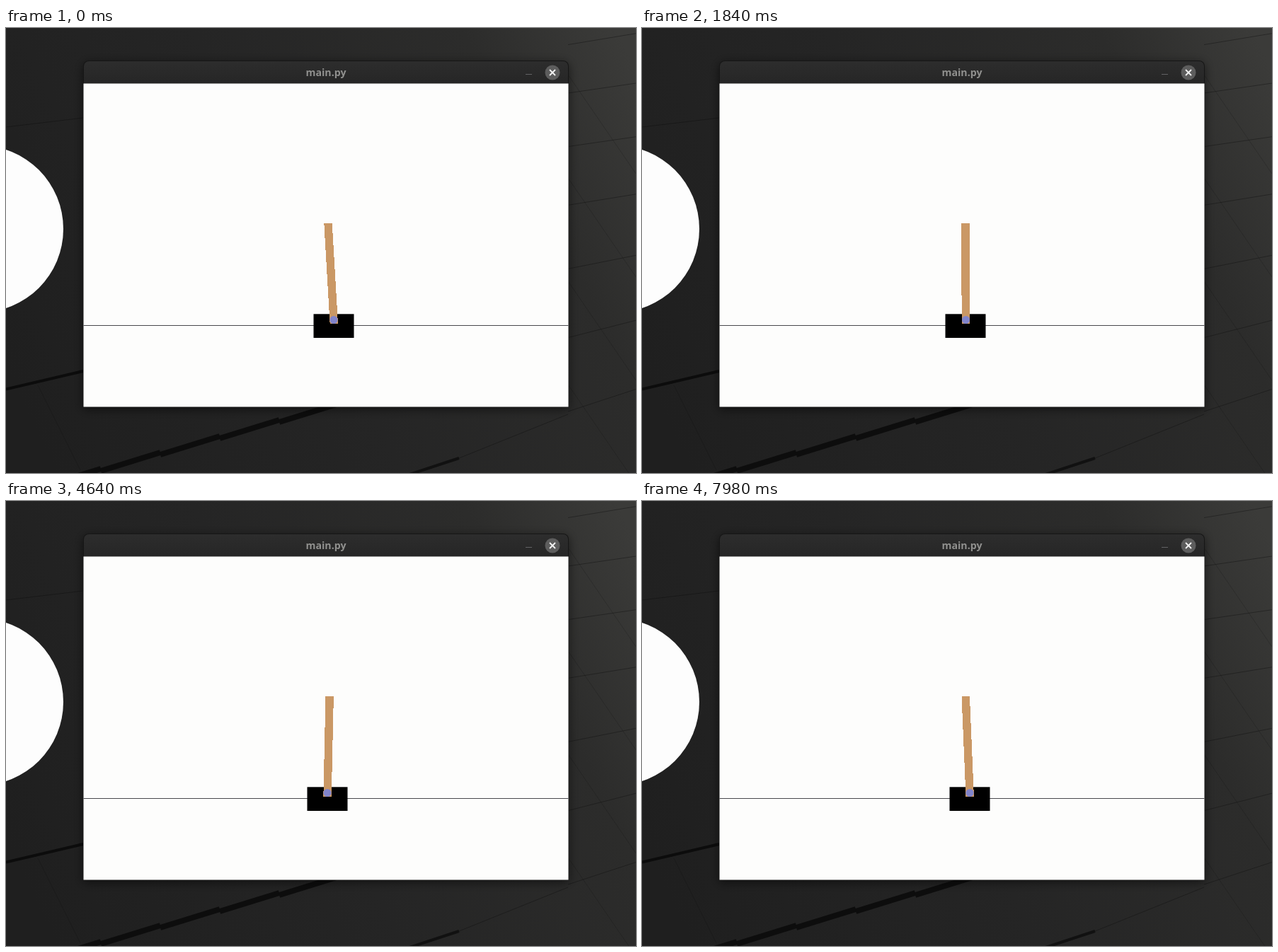
An HTML page with a canvas that plays this animation: 890 by 629 pixels, repeating every 8 s.

```html
<!DOCTYPE html>
<html lang="en">
<head>
<meta charset="utf-8">
<title>main.py</title>
<style>
  html, body { margin: 0; width: 100%; height: 100%; overflow: hidden; background: #252525; }
  canvas { display: block; }
</style>
</head>
<body>
<canvas id="stage" width="890" height="629"></canvas>
<script>
const W = 890, H = 629, LOOP = 8000;
const AXLE_Y = 412.5, REACH = 137, POLE_HALF = 5.7, CART_W = 57;

const ctx = document.getElementById('stage').getContext('2d');
const backdrop = document.createElement('canvas');
backdrop.width = W;
backdrop.height = H;

function line(g, x1, y1, x2, y2, color, width = 1) {
  g.beginPath();
  g.moveTo(x1, y1);
  g.lineTo(x2, y2);
  g.strokeStyle = color;
  g.lineWidth = width;
  g.stroke();
}

function disc(g, x, y, r, color) {
  g.beginPath();
  g.arc(x, y, r, 0, Math.PI * 2);
  g.fillStyle = color;
  g.fill();
}

function panel(g, x, y, w, h, r, fill) {
  g.beginPath();
  g.roundRect(x, y, w, h, [r, r, 0, 0]);
  g.fillStyle = fill;
  g.fill();
}

function drawWallpaper(g) {
  const shade = g.createLinearGradient(0, 480, W, 60);
  shade.addColorStop(0, '#1f1f1f');
  shade.addColorStop(0.45, '#252525');
  shade.addColorStop(0.8, '#2c2c2b');
  shade.addColorStop(1, '#3b3b39');
  g.fillStyle = shade;
  g.fillRect(0, 0, W, H);

  // Tile joints spread out towards the viewer
  const joint = 'rgba(12,12,12,0.38)', faint = 'rgba(12,12,12,0.2)';
  for (let i = -1; i <= 5; i++) {
    line(g, 794, 92 + 72 * i + 3.6 * i * i, W, 78 + 73 * i + 2.7 * i * i, joint);
  }
  for (let i = 0; i < 4; i++) {
    line(g, 794, 66 + 146 * i, W, 206 + 146 * i, faint);
  }
  line(g, 640, 608, 794, 546, joint);
  line(g, 0, 140, 109, 127, joint);
  line(g, 45, 505, 105, 625, faint);

  // Dark seams, the lower one in overlapping steps
  line(g, 0, 510.5, 109, 485, '#0c0c0c', 4);
  for (let i = -1; i < 4; i++) {
    const x = 218 + 84 * i, y = 600 - 23 * i;
    line(g, x - 84, y + 26, x, y, '#0d0d0d', 8);
  }
  line(g, 570, 631, 640, 608, '#111', 4);

  disc(g, -37, 284, 118, '#fdfdfd');
}

function drawWindow(g) {
  g.save();
  g.shadowColor = 'rgba(0,0,0,0.55)';
  g.shadowBlur = 14;
  g.shadowOffsetY = 3;
  panel(g, 109, 46, 686, 490, 8, '#161616');
  g.restore();

  const bar = g.createLinearGradient(0, 47, 0, 78);
  bar.addColorStop(0, '#2d2d2d');
  bar.addColorStop(1, '#262626');
  panel(g, 110, 47, 684, 32, 7, bar);

  g.font = 'bold 14.2px "Noto Sans", "Open Sans", sans-serif';
  g.textAlign = 'center';
  g.fillStyle = '#90908e';
  g.fillText('main.py', 452, 68.3);

  line(g, 734, 65.5, 743, 65.5, '#626264');
  disc(g, 772, 63, 10.5, '#5d5d5d');
  line(g, 768, 59, 776, 67, '#f4f4f4', 1.8);
  line(g, 776, 59, 768, 67, '#f4f4f4', 1.8);

  g.fillStyle = '#fdfdfc';
  g.fillRect(109.5, 78.5, 685, 457);
  line(g, 109.5, 420.5, 794.5, 420.5, '#48484c');
}

// The cart drifts left and back while the pole tip settles
function poseAt(t) {
  const a = t / LOOP * Math.PI * 2;
  return {
    x: 457.7 + 5.3 * Math.cos(a) - 1.2 * Math.sin(a) + 0.6 * Math.sin(2 * a),
    tip: 457.2 - 2.2 * Math.exp(-t / 1000)
  };
}

function drawCart({ x, tip }) {
  const axle = Math.round(x * 2) / 2;
  ctx.fillStyle = '#000';
  ctx.fillRect(Math.round(x) - CART_W / 2, 404.3, CART_W, 33.7);

  // Whole-pixel rows keep the stepped pole edges
  ctx.fillStyle = '#ca9865';
  for (let y = 276; y < 418; y++) {
    const mid = x + (tip - x) * (AXLE_Y - y) / REACH;
    const left = Math.round(mid - POLE_HALF);
    ctx.fillRect(left, y, Math.round(mid + POLE_HALF) - left, 1);
  }
  disc(ctx, axle, AXLE_Y, 5.5, '#8184cb');
}

drawWallpaper(backdrop.getContext('2d'));
drawWindow(backdrop.getContext('2d'));

function frame() {
  ctx.drawImage(backdrop, 0, 0);
  drawCart(poseAt(performance.now() % LOOP));
  requestAnimationFrame(frame);
}
frame();
</script>
</body>
</html>
```
